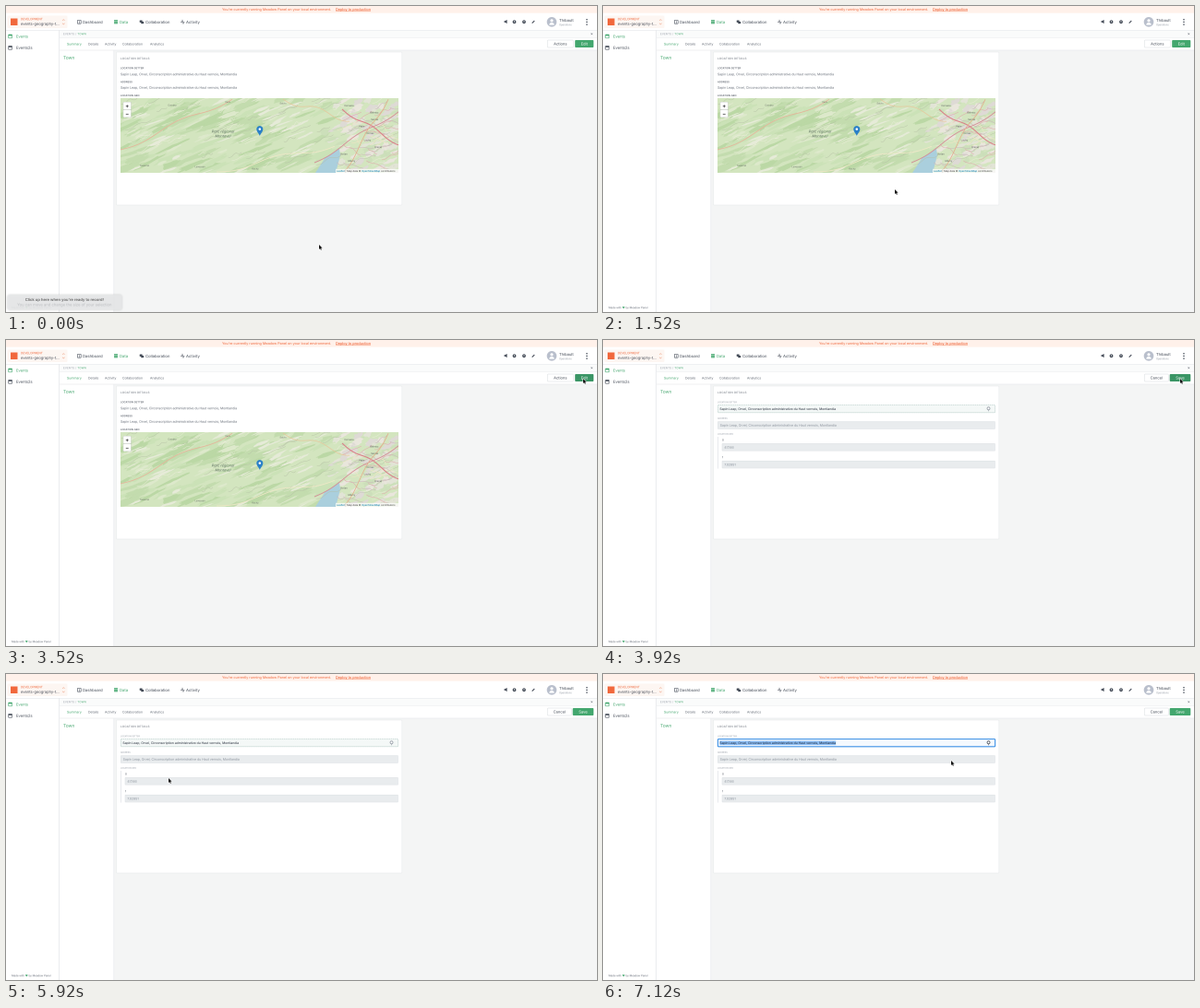
These frames come from a looping animation (640x332 px, 8 s). An HTML page with a canvas:

```html
<!DOCTYPE html>
<html lang="en">
<head>
<meta charset="utf-8">
<title>Record editing</title>
<style>
html, body { margin: 0; width: 100%; height: 100%; overflow: hidden; background: #fff; }
canvas { display: block; width: 640px; height: 332px; }
</style>
</head>
<body>
<canvas id="stage"></canvas>
<script>
const W = 640, H = 332, LOOP = 8000, FINE = 4;
const HOVER_AT = 3120, EDIT_AT = 3920, FOCUS_AT = 6320;
const GREEN = '#43a76e', INK = '#444b57', SOFT = '#666d78', GREY = '#9299a3', LINE = '#e6e8eb', ORANGE = '#f1683d';
const ADDRESS = 'Sapin Leap, Orvel, Circonscription administrative du Haut vernois, Montlandia';

const canvas = document.getElementById('stage');
const screen2d = canvas.getContext('2d');
const dpr = window.devicePixelRatio || 1;
canvas.width = W * dpr;
canvas.height = H * dpr;

// Drawn oversized and scaled down, so tiny text stays clear of pixel snapping
const buffer = document.createElement('canvas');
buffer.width = W * FINE;
buffer.height = H * FINE;
const g = buffer.getContext('2d');
g.scale(FINE, FINE);

// Pointer moves: start, end, x, y
const START = [339, 259];
const moves = [
  [0, 1360, 316, 199], [1760, 2720, 625, 42], [3920, 4960, 136, 100],
  [4960, 5920, 176, 113], [5920, 6320, 127, 74], [6320, 7120, 377, 94]
];

const clamp = (v, a, b) => Math.max(a, Math.min(b, v));

function pointer(t) {
  let [x, y] = START;
  for (const [from, to, tx, ty] of moves) {
    const u = clamp((t - from) / (to - from), 0, 1), e = u * u * (3 - 2 * u);
    x += (tx - x) * e;
    y += (ty - y) * e;
  }
  return [x, y];
}

function hold(t) {
  const r = t % 400, base = t - r;
  return Math.max(0, base + (r < 160 ? -80 : r < 320 ? 160 : 320));
}

function random(seed) {
  const next = () => (seed = (seed * 16807) % 2147483647) / 2147483647;
  return (a, b) => a + next() * (b - a);
}

function rect(x, y, w, h, fill, stroke, radius = 0, lw = 0.6) {
  g.beginPath();
  g.roundRect(x, y, w, h, radius);
  if (fill) { g.fillStyle = fill; g.fill(); }
  if (stroke) { g.strokeStyle = stroke; g.lineWidth = lw; g.stroke(); }
}

function disc(x, y, r, fill) {
  g.beginPath();
  g.arc(x, y, r, 0, Math.PI * 2);
  g.fillStyle = fill;
  g.fill();
}

function poly(pts, fill) {
  g.beginPath();
  pts.forEach(p => g.lineTo(...p));
  g.closePath();
  g.fillStyle = fill;
  g.fill();
}

function line(pts, color, lw = 0.6) {
  g.beginPath();
  pts.forEach(p => g.lineTo(...p));
  g.strokeStyle = color;
  g.lineWidth = lw;
  g.stroke();
}

// Text centred on y; returns its width
function text(s, x, y, size, color, { style = '400', align = 'left', gap = 0 } = {}) {
  g.save();
  g.translate(x, y + size * 0.36);
  g.scale(0.1, 0.1);
  g.textRendering = 'geometricPrecision';
  g.font = `${style} ${size * 10}px Inter, sans-serif`;
  g.letterSpacing = gap * 10 + 'px';
  g.textAlign = align;
  g.fillStyle = color;
  g.fillText(s, 0, 0);
  const width = g.measureText(s).width / 10;
  g.restore();
  return width;
}

// Pieces of text in a row, each with its own colour
function run(pieces, x, y, size, opt) {
  for (const [s, color] of pieces) x += text(s, x, y, size, color, opt);
}

function banner() {
  rect(0, 0, W, 7.6, '#fff1ea');
  text("You're currently running Meadow Panel on your local environment.", 234, 3.6, 3.75, ORANGE);
  const w = text('Deploy to production', 357, 3.6, 3.8, ORANGE, { style: '500' });
  line([[357, 5.7], [357 + w, 5.7]], ORANGE, 0.4);
}

function project() {
  rect(1.5, 10.5, 65, 13.5, '#fdf6f2', null, 1.5);
  rect(5, 13.5, 7.5, 7.5, ORANGE);
  text('DEVELOPMENT', 16, 14.2, 3.2, ORANGE);
  text('events-geography-t…', 16, 19.4, 4.05, INK);
  for (const d of [-1, 1]) {
    const y = 17.3 + d * 1.4;
    line([[61, y], [62.3, y + d * 1.3], [63.6, y]], '#f0a78b', 0.5);
  }
}

function nav() {
  const items = [['Dashboard', 83, INK], ['Data', 123, GREEN], ['Collaboration', 151, INK], ['Activity', 195, INK]];
  for (const [name, x, color] of items) text(name, x, 17.5, 4.2, color);
  rect(77.4, 15.4, 3.8, 3.8, null, INK, 0.5);
  line([[79.3, 18.6], [79.3, 16.4]], INK, 0.6);
  for (let i = 0; i < 3; i++) rect(117, 15.2 + i * 1.5, 4, 1.1, GREEN, null, 0.3);
  rect(144.7, 15.5, 3, 2.4, INK, null, 0.5);
  rect(146.2, 17, 3, 2.2, INK, null, 0.5);
  line([[189, 17.6], [190.4, 17.6], [191, 15.4], [192, 19.2], [192.6, 17.4], [193.4, 17.4]], INK, 0.5);
}

function account() {
  poly([[538.8, 17], [542.6, 15], [542.6, 19]], INK);
  for (const x of [550.5, 561]) {
    disc(x, 17.2, 1.9, INK);
    rect(x - 0.3, 16, 0.6, 1.9, '#fff');
  }
  line([[569.7, 18.6], [572.3, 16]], INK, 1.1);
  disc(591, 17.3, 5.3, '#b9bfcc');
  disc(591, 15.8, 1.6, '#fff');
  rect(588.3, 18, 5.4, 2.6, '#fff', null, [2.4, 2.4, 0, 0]);
  text('Thibault', 599, 15.6, 4.1, INK);
  text('Operations', 599, 20.3, 2.65, GREY);
  for (let i = -1; i < 2; i++) disc(629, 17.4 + i * 2.7, 0.75, INK);
}

function sidebar() {
  for (const [name, y, color] of [['Events', 32.9, GREEN], ['Events2s', 45.3, INK]]) {
    rect(2.7, y - 1.9, 3.8, 3.8, null, color, 0.4);
    rect(2.7, y - 1.9, 3.8, 1.4, color);
    text(name, 11, y, 4.1, color);
  }
  line([[57.5, 26], [57.5, H]], LINE, 0.8);
  run([['Made with ', SOFT], ['♥', GREEN], [' by Meadow Panel', SOFT]], 6, 327.3, 2.85);
}

function button(x, w, label, fill, border, color) {
  rect(x, 37, w, 8, fill, border, 1, 0.5);
  text(label, x + w / 2, 41, 4.05, color, { align: 'center' });
}

function frame(editing, hover) {
  rect(58, 26.6, W - 58, 7.6, '#fafbfb');
  run([['EVENTS / ', GREY], ['TOWN', GREEN]], 62, 30.3, 2.8, { gap: 0.2 });
  text('×', 634.3, 30, 4.2, INK, { align: 'center' });
  line([[58, 34.4], [W, 34.4]], LINE, 0.4);

  const tabs = [['Summary', 66], ['Details', 89], ['Activity', 107], ['Collaboration', 126], ['Analytics', 156]];
  tabs.forEach(([name, x], i) => text(name, x, 41.3, 3.5, i ? SOFT : GREEN));

  const green = hover ? '#3a9565' : GREEN;
  if (editing) {
    button(586.3, 26, 'Cancel', '#fff', '#d9dcdf', INK);
    button(613.7, 22.6, 'Save', green, null, '#fff');
  } else {
    button(586.3, 28, 'Actions', '#fff', '#d9dcdf', INK);
    button(616.2, 20.1, 'Edit', green, null, '#fff');
  }

  rect(117, 48, W - 117, H - 48, '#f4f5f5');
  line([[58, 48], [W, 48]], LINE);
  line([[116.8, 48], [116.8, H]], LINE);
  text('Town', 62, 56, 4.8, GREEN);
  rect(119.6, 50, 309.2, 166, '#fff', '#e9ebed', 0.8);
  text('LOCATION DETAILS', 124, 56.8, 3, SOFT, { gap: 0.22 });
}

function blob(rnd, x, y, rx, ry, fill) {
  const pts = [], turn = rnd(-0.48, -0.3), c = Math.cos(turn), s = Math.sin(turn);
  for (let a = 0; a < 6.28; a += 0.4) {
    const k = rnd(0.65, 1.25), px = Math.cos(a) * rx * k, py = Math.sin(a) * ry * k;
    pts.push([x + px * c - py * s, y + px * s + py * c]);
  }
  poly(pts, fill);
}

function scatter(rnd, n, [x0, x1], rx, ry, colors) {
  for (let i = 0; i < n; i++) {
    blob(rnd, rnd(x0, x1), rnd(98, 183), rnd(rx / 3, rx), rnd(ry / 3, ry), colors[i % colors.length]);
  }
}

function road(x0, y0, x1, y1, color, lw, sway = 3) {
  const pts = [];
  for (let u = 0; u <= 1.001; u += 0.05) {
    pts.push([x0 + (x1 - x0) * u, y0 + (y1 - y0) * u + Math.sin(u * 9) * sway]);
  }
  line(pts, color, lw);
}

function terrain() {
  const rnd = random(41);
  rect(124, 100, 301, 81, '#d3e5bf');
  scatter(rnd, 110, [120, 350], 24, 3.6, ['#c3dcae', '#cbe2b7', '#bbd8a5']);
  scatter(rnd, 70, [120, 350], 15, 1.7, ['#e6ebd8', '#dde9cb']);
  scatter(rnd, 90, [345, 428], 9, 4, ['#e2e4d6', '#ccdfba', '#dedad5', '#e9e6dc']);
  poly([[335, 181], [346, 164], [361, 155], [362, 162], [357, 181]], '#aacfdd');

  // Lanes, then the denser town network
  for (let i = 0; i < 70; i++) {
    const x = rnd(120, 420), y = rnd(102, 184), l = rnd(8, 30);
    road(x, y, x + l, y - l * 0.4, i % 2 ? '#b3bda3' : '#f2f0e2', 0.35, rnd(0.3, 1.6));
  }
  for (let i = 0; i < 34; i++) {
    const x = rnd(358, 420), y = rnd(108, 172);
    road(x, y, x + rnd(8, 26), y + rnd(-14, 12), ['#c9b7b8', '#f3e6c6', '#e0a9ac'][i % 3], 0.5, rnd(0.3, 1.5));
  }
  road(124, 156, 245, 100, '#e6b49a', 0.8);
  road(228, 180, 356, 151, '#f0e9c8', 0.8);
  road(300, 101, 372, 124, '#e8c79c', 0.7);
  road(334, 170, 425, 114, '#d48f98', 0.9, 2);
  road(364, 112, 425, 150, '#d9828a', 1.1, 2);
  road(366, 180, 414, 100, '#e2b08c', 0.8);
}

function places() {
  const rnd = random(7), opt = { align: 'center' };
  const villages = ['Tavernel', 'Combry', 'Lavessan', 'Vaux', 'Rochy', 'Salvin'];
  const towns = ['Corvane', 'Belmoz', 'Sarnel', 'Pélin', 'Ormaz', 'Luchy', 'Brenel', 'Vorlan', 'Mervy'];
  villages.forEach((s, i) => text(s, 150 + i * 30, i % 2 ? rnd(103, 108) : rnd(173, 178), 2.5, '#6c746a', opt));
  towns.forEach((s, i) => text(s, rnd(350, 415), 108 + i * 7.5, 2.6, '#5f6360', opt));
  const italic = { style: 'italic 400', align: 'center' };
  text('Parc régional', 235, 136, 3.9, '#5b7060', italic);
  text('Montavel', 235, 141, 3.9, '#5b7060', italic);
}

function pin(x, y) {
  g.beginPath();
  g.moveTo(x, y);
  g.bezierCurveTo(x - 1, y - 3, x - 3.5, y - 4.5, x - 3.5, y - 7.4);
  g.arc(x, y - 7.4, 3.5, Math.PI, 0);
  g.bezierCurveTo(x + 3.5, y - 4.5, x + 1, y - 3, x, y);
  g.fillStyle = '#2a80c8';
  g.fill();
  disc(x, y - 7.4, 1.3, '#fff');
}

function map() {
  g.save();
  g.beginPath();
  g.rect(124, 100, 301, 81);
  g.clip();
  terrain();
  places();
  pin(274.8, 141);
  for (const [sign, y] of [['+', 104.2], ['−', 112.6]]) {
    rect(127, y, 8.4, 8.2, '#fff', '#c3c7c1', 0.8, 0.4);
    text(sign, 131.2, y + 4.2, 6, '#222', { style: '600', align: 'center' });
  }
  rect(357, 176.8, 68, 4.2, 'rgba(255,255,255,.75)');
  const blue = '#0078a8', dark = '#444';
  run([['Leaflet', blue], [' | Map data © ', dark], ['OpenStreetMap', blue], [' contributors', dark]], 358, 179, 2.7);
  g.restore();
}

function details() {
  const label = { style: '500', gap: 0.1 };
  text('LOCATION SETTER', 124, 67.4, 2.6, INK, label);
  text(ADDRESS, 124, 73.9, 3.45, SOFT);
  text('ADDRESS', 124, 82.2, 2.6, INK, label);
  text(ADDRESS, 124, 88.6, 3.45, SOFT);
  text('LOCATION GEO', 124, 97, 2.6, INK, label);
  map();
}

function disabled(x, y, h, value) {
  rect(x, y, 424.5 - x, h, '#e9ecee', '#dde1e4', 0.6, 0.5);
  text(value, x + 2.4, y + h / 2 + 0.1, 3.45, '#88909a');
}

function setter(focused, px) {
  if (!focused) g.setLineDash([1.2, 0.8]);
  rect(124.4, 70.6, 300.2, 8.2, focused ? '#f4f9fe' : '#f4f8f7', focused ? '#3f92e6' : '#a3bfba', 0.7, focused ? 1.1 : 0.6);
  g.setLineDash([]);
  const w = text(ADDRESS, 126.4, 74.9, 3.4, INK, { style: '500' });
  if (focused) {
    g.globalCompositeOperation = 'multiply';
    rect(126.4, 72.5, clamp(px - 126.4, 0, w), 4.6, '#92c2f4');
    g.globalCompositeOperation = 'source-over';
  }
  const icon = focused ? INK : GREY;
  disc(417.5, 74.3, 1.9, icon);
  disc(417.5, 74.3, 1.1, '#fff');
  line([[417.5, 76], [417.5, 77.3]], icon);
}

function form(focused, px) {
  text('LOCATION SETTER', 124, 67.3, 2.3, GREY);
  setter(focused, px);
  text('ADDRESS', 124, 84.8, 2.3, GREY);
  disabled(124.3, 88.5, 8, ADDRESS);
  text('LOCATION GEO', 124, 102, 2.3, GREY);
  line([[124.5, 105], [124.5, 139.5]], '#d9dde1');
  ['47.146', '7.02951'].forEach((value, i) => {
    const y = 108.4 + i * 18.8;
    text(String(i), 129, y, 2.9, INK);
    disabled(129, y + 4, 7.8, value);
  });
}

function toast(alpha) {
  if (alpha <= 0) return;
  g.save();
  g.globalAlpha = alpha;
  g.shadowColor = 'rgba(0,0,0,.2)';
  g.shadowBlur = 2 * FINE;
  rect(1.5, 313.3, 124, 16.4, 'rgba(232,233,234,.92)', null, 2.5);
  g.shadowColor = 'transparent';
  text("Click up here when you're ready to record!", 63.3, 318.4, 4.15, '#666', { style: '600', align: 'center' });
  text('You can move and change the size of your selection', 63.3, 324.1, 4.15, '#bbbdc0', { align: 'center' });
  g.restore();
}

function arrow(x, y) {
  const shape = [[0, 0], [0, 5], [1.15, 4], [1.95, 5.8], [2.8, 5.4], [2, 3.7], [3.6, 3.6]];
  const pts = shape.map(([dx, dy]) => [x + dx, y + dy]);
  line([...pts, pts[0]], '#fff', 0.9);
  poly(pts, '#111');
}

function draw(t) {
  const [px, py] = pointer(t), editing = t >= EDIT_AT;
  rect(0, 0, W, H, '#fff');
  banner();
  project();
  nav();
  account();
  line([[0, 26.3], [W, 26.3]], LINE);
  sidebar();
  frame(editing, t >= HOVER_AT && px > 614 && py < 46);
  if (editing) form(t >= FOCUS_AT, px);
  else details();
  toast(1 - t / 700);
  arrow(px, py);
  screen2d.imageSmoothingQuality = 'high';
  screen2d.drawImage(buffer, 0, 0, canvas.width, canvas.height);
}

const start = performance.now();
let shown = -1;
function tick() {
  const t = hold((performance.now() - start) % LOOP);
  if (t !== shown) draw(shown = t);
  requestAnimationFrame(tick);
}
tick();
</script>
</body>
</html>
```
